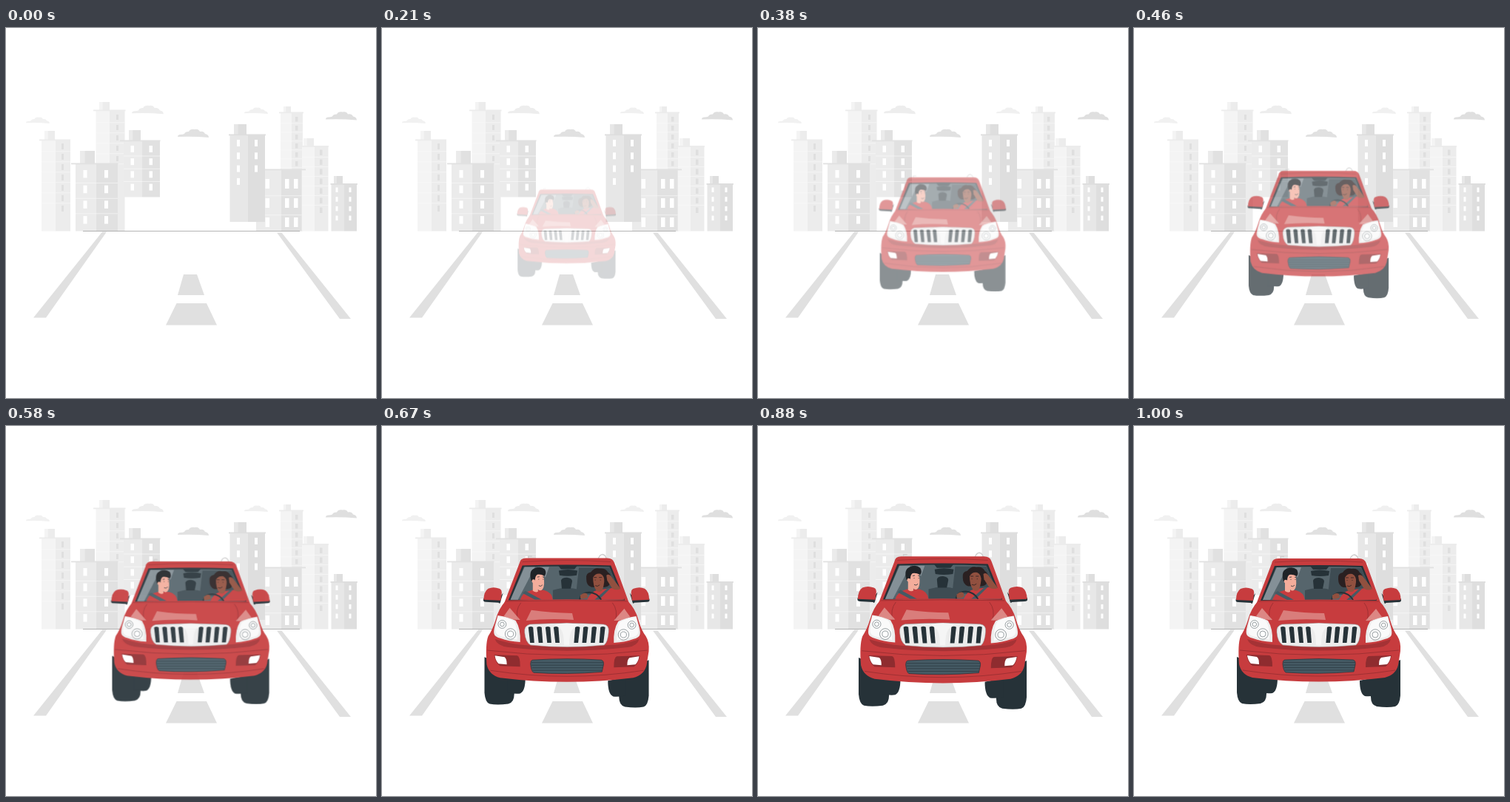
Animation, 500 px wide and 500 px high, one loop 1.04 s. Source, as an HTML page:

```html
<!DOCTYPE html>
<html lang="en">
<head>
<meta charset="utf-8">
<title>Car in the city</title>
<style>
  html, body { margin: 0; height: 100%; overflow: hidden; background: #fff; }
  svg { display: block; width: 100vw; height: 100vh; }
</style>
</head>
<body>
<svg viewBox="0 0 500 500">
  <defs>
    <path id="cloud" d="M0 11Q0 8 4 8Q7 8 9 7Q10 4 15 4Q17 0 23 1Q28 0 30 4Q35 3 37 7Q42 8 42 12Q21 10 0 11Z"/>
    <g id="mirror">
      <path fill="#263238" d="M138 233Q136 238 141 238L158 239Q160 242 161 236L164 226L160 231Z"/>
      <path fill="#c73c3e" d="M138 235Q138 224 144 220Q151 217 159 220Q163 221 162 228L161 236Z"/>
    </g>
    <g id="wheel" fill="#263238">
      <path d="M139 312V360Q140 373 146 375Q156 377 171 375Q179 373 179 362V330Z"/>
      <path d="M170 335V360Q181 362 187 361Q194 358 194 340Z"/>
    </g>
    <g id="lamp">
      <path fill="#ededed" d="M157 256Q172 258 181 263Q188 274 187 292Q171 291 161 287Q153 285 152 281Q151 278 153 270Z"/>
      <path fill="#fafafa" d="M157 257Q172 259 179 264Q184 274 183 289L160 284Q154 282 154 276Z"/>
      <g fill="#fff" stroke="#6d777b" stroke-width=".7">
        <circle cx="162.8" cy="268" r="5.4"/><circle cx="162.8" cy="268" r="2.8"/>
        <circle cx="174" cy="281" r="7.2"/><circle cx="174" cy="281" r="4"/>
      </g>
      <path fill="#e3a09c" opacity=".75" d="M173 246L187 262Q178 263 165 257Z"/>
      <path fill="#8f2c2f" d="M152 309L183 310Q187 311 187 325L160 324Q154 320 152 309Z"/>
      <path fill="#fff" d="M153 310L166 312Q169 314 169 322L158 321Q154 317 153 310Z"/>
    </g>
  </defs>

  <g id="city"></g>
  <path stroke="#a2a2a2" stroke-width=".8" d="M104 274.5H397"/>
  <path fill="#e0e0e0" d="M130 275.5H136L54 391.5H37ZM366 276.5H372.5L466 393H451ZM240 333H258L268 361H232ZM230.500 372H271L285 401.500H216Z"/>

  <g id="car">
    <use href="#wheel"/>
    <use href="#wheel" transform="matrix(-1 0 0 1 499 4)"/>
    <use href="#mirror"/>
    <use href="#mirror" transform="matrix(-1 0 0 1 498.500 0)"/>

    <!-- cabin -->
    <path fill="none" stroke="#cfcfcf" stroke-width="1.500" d="M292 180Q294 174 298 174Q302 175 303 180M198 179V176.500H203"/>
    <path fill="#c73c3e" d="M186 186Q187 179 195 179H304Q312 179 314 186L334 241H165Z"/>
    <path fill="none" stroke="#8f2c2f" stroke-width=".6" d="M190 184Q250 180 309 184"/>
    <path fill="#263238" d="M190 189Q250 187 309 189L328 236H171Z"/>
    <path fill="#56656c" d="M192 191Q250 189 307 191L325 235H174Z"/>
    <path fill="#849097" d="M193 191H207L184 235H174ZM211 191H226L221 205Z"/>
    <path fill="#3e4c53" d="M266 192H307L322 228H262ZM231 222Q250 216 268 222V235H231Z"/>
    <path fill="#263238" d="M238 189H264L260 194H242ZM239 196Q251 193 264 196L263 202Q251 204 240 202ZM242 209Q243 205 250 205Q257 206 257 210L255 220H243Z"/>

    <!-- passenger -->
    <path fill="#c73c3e" d="M187 235Q190 225 203 222H219Q230 225 231 235Z"/>
    <path fill="#f4ad9b" d="M204 199H218Q221 216 217 221Q214 224 211 221V224Q208 226 204 223Z"/>
    <path fill="#1f2327" d="M202 210Q198 196 206 193Q214 189 220 194Q223 199 220 203Q214 200 210 201Q207 203 207 209Z"/>
    <circle cx="205" cy="210" r="2.300" fill="#f4ad9b"/>
    <path fill="none" stroke="#263238" stroke-width=".8" d="M210 204.500L213 204M217 204L219 205M212 207V208M218 207V208M212 216Q215 218 217 215"/>
    <path fill="#455a64" d="M190 226L194 223L216 235H207Z"/>

    <!-- driver -->
    <path fill="#2a2021" d="M276 207Q275 199 282 198Q287 191 294 193Q302 192 305 198Q311 202 308 209Q309 217 301 218H283Q276 216 276 207Z"/>
    <path fill="#c73c3e" d="M277 235Q282 224 291 222L312 219L322 220Q328 228 327 235Z"/>
    <path fill="#91503f" d="M303 202Q306 200 309 203L322 220Q318 223 311 220L304 209Z"/>
    <path fill="#91503f" d="M285 205Q288 199 295 200Q301 203 300 211Q299 219 297 223Q292 226 289 222Q285 216 285 205Z"/>
    <path fill="none" stroke="#2a2021" stroke-width=".8" d="M286 205H290M293 205H297M288 208V209M295 208V209M288 216Q291 218 294 215"/>
    <path fill="#455a64" d="M304 220L309 219L293 235H287Z"/>
    <path fill="none" stroke="#263238" stroke-width="2" d="M267 235Q269 225 280 225Q291 226 296 235"/>
    <path fill="#91503f" d="M268 229Q273 224 277 227L278 232Q271 235 268 233Z"/>

    <!-- front -->
    <path fill="#c73c3e" d="M168 236Q250 233 331 236Q342 247 346 262Q350 276 356 284Q361 292 360 304L357 323Q354 336 339 340Q250 351 160 340Q145 336 142 322Q140 295 144 284Q150 275 154 262Q158 247 168 236Z"/>
    <path fill="#e3a09c" opacity=".65" d="M202 249Q230 253 257 253L259 262Q225 260 195 263Z"/>
    <path fill="none" stroke="#8f2c2f" stroke-width=".7" d="M168 237Q250 235 331 237M188 239Q180 249 184 263M311 239Q319 249 315 263M143 303Q250 316 358 303M147 330Q250 346 353 330"/>
    <path fill="#a53235" d="M153 288Q177 295 193 296Q250 302 307 296Q328 295 347 288Q345 297 332 299Q250 308 171 299Q156 297 153 288Z"/>
    <path fill="#ececec" stroke="#8e9698" stroke-width=".5" d="M200 268Q250 265 299 268Q307 269 306 278Q305 292 300 296Q250 301 201 296Q194 292 193 279Q192 270 200 268Z"/>
    <g id="slats" fill="#263238"></g>
    <path fill="#f5f5f5" d="M234 268Q250 265 265 268L257 275Q253 280 253 296H246Q246 280 242 275Z"/>
    <path fill="#455a64" stroke="#263238" stroke-width=".7" d="M204 316Q250 313 296 316Q300 317 299 323L297 332Q250 336 205 333Q202 331 201 322Q201 316 204 316Z"/>
    <path fill="none" stroke="#2c3b43" stroke-width=".8" d="M202 319.500H299M202 323H299M203 326.500H298M204 330H297"/>
    <use href="#lamp"/>
    <use href="#lamp" transform="matrix(-1 0 0 1 500 1)"/>
  </g>
</svg>
<script>
const $ = id => document.getElementById(id);
const rect = (x, y, w, h, fill) =>
  `<rect x="${x}" y="${y}" width="${w}" height="${h}" fill="${fill}"/>`;

// Walls left and right of an edge, a ledge, a chimney and columns of windows.
function tower({ x, edge, end, top, base = 274.5, tones, ledge, chimney, cols, size, first, step, rows, glass = '#fff', lines }) {
  const [light, dark] = tones;
  let out = rect(x, top, edge - x, base - top, light) + rect(edge, top, end - edge, base - top, dark);
  if (chimney) {
    const [a, b, y] = chimney;
    out += rect(a, y, b - a, top - y, dark) + rect(a, y, (b - a) / 3, top - y, light);
  }
  out += rect(ledge[0], top - 1, ledge[1] - ledge[0], 1.8, dark);
  cols.forEach((c, i) => {
    const count = Array.isArray(rows) ? rows[i] : rows;
    for (let r = 0; r < count; r++) out += rect(c, first + r * step, size[0], size[1], glass);
  });
  if (lines) for (let r = 1; r <= lines; r++) out += rect(x, first + r * step - 3.5, end - x, .6, '#fafafa');
  return out;
}

const pale = ['#f4f4f4', '#ececec'], mid = ['#ebebeb', '#e1e1e1'], deep = ['#e7e7e7', '#dedede'];
const towers = [
  { x: 48, edge: 67, end: 87, top: 151.5, tones: pale, ledge: [45, 87], chimney: [52, 66, 139], cols: [75], size: [3, 8], first: 156, step: 14, rows: 7, glass: '#dfdfdf', lines: 6 },
  { x: 121.5, edge: 140, end: 160.5, top: 111.5, tones: pale, ledge: [118, 161.5], chimney: [126, 140, 100], cols: [149], size: [3, 7], first: 117, step: 14, rows: 5, glass: '#dfdfdf', lines: 5 },
  { x: 159, edge: 184, end: 208, top: 152.5, base: 228.5, tones: mid, ledge: [154, 208.5], chimney: [166, 182, 138], cols: [168.5, 193.5], size: [4.5, 9], first: 159, step: 17.2, rows: 4, lines: 3 },
  { x: 94, edge: 122, end: 151, top: 183.5, tones: mid, ledge: [88, 151.5], chimney: [100, 120, 166], cols: [104.500, 133], size: [5, 10.5], first: 192, step: 20.7, rows: 4, lines: 3 },
  { x: 371, edge: 386, end: 401, top: 114.5, tones: pale, ledge: [369, 402], chimney: [375, 385, 106], cols: [391], size: [3.5, 6.5], first: 120, step: 12, rows: 6, glass: '#dfdfdf', lines: 6 },
  { x: 400, edge: 417, end: 435.5, top: 160, tones: pale, ledge: [398, 436], chimney: [402, 416, 149], cols: [424], size: [3.5, 7.5], first: 164.5, step: 13, rows: 7, glass: '#dfdfdf', lines: 6 },
  { x: 338, edge: 372, end: 399.5, top: 191.5, tones: mid, ledge: [350, 405], cols: [350.500, 377, 389], size: [5.500, 13], first: 204, step: 26, rows: 3, lines: 2 },
  { x: 302.5, edge: 326.5, end: 350, top: 144.5, base: 262, tones: deep, ledge: [301, 351], chimney: [308, 325, 130], cols: [312, 336], size: [4, 9], first: 151, step: 17.3, rows: [4, 3] },
  { x: 439.5, edge: 457, end: 474, top: 211, tones: deep, ledge: [438.5, 475], chimney: [443, 455, 200], cols: [445.5, 463.5], size: [3, 6.5], first: 215.5, step: 12.7, rows: 4 }
];
const clouds = [[27, 120, .76, '#f1f1f1'], [170, 104, 1.02, '#ededed'], [232, 136, 1, '#e1e1e1'], [322, 107, .76, '#f0f0f0'], [432, 112.5, 1, '#dfdfdf']];
// The tower block's flank stays white left of the taller neighbour.
$('city').innerHTML = clouds.map(([x, y, s, c]) =>
  `<use href="#cloud" fill="${c}" transform="translate(${x} ${y}) scale(${s})"/>`).join('')
  + towers.map(tower).join('');

let slats = '';
for (const side of [-1, 1])
  for (const d of [14.5, 25.5, 37, 48.5]) {
    const x = 249.7 + side * d, lean = side * 2;
    slats += `<path d="M${x - 3.2} 272Q${x} 270 ${x + 3.2} 272L${x + 2.8 - lean} 293H${x - 2.8 - lean}Z"/>`;
  }
$('slats').innerHTML = slats;

const bezier = (a, b, s) => 3 * (1 - s) ** 2 * s * a + 3 * (1 - s) * s * s * b + s ** 3;

// Overshooting ease: cubic-bezier(.36, -.01, .5, 1.38)
function ease(x) {
  if (x >= 1) return 1;
  let lo = 0, hi = 1;
  for (let i = 0; i < 24; i++) {
    const m = (lo + hi) / 2;
    if (bezier(.36, .5, m) < x) lo = m; else hi = m;
  }
  return bezier(-.01, 1.38, lo);
}

const car = $('car'), LOOP = 1040, FPS = 24;
const start = performance.now();

function draw(now) {
  const t = Math.max(0, now - start) % LOOP;
  const step = Math.floor((t + 4) * FPS / 1000);
  const p = ease(step / FPS + .025);
  const scale = .5 + p / 2;
  car.setAttribute('opacity', step < 3 ? 0 : Math.min(1, p));
  car.setAttribute('transform', `translate(249.300 277) scale(${scale}) translate(-249.300 -277)`);
  requestAnimationFrame(draw);
}
draw(start);
</script>
</body>
</html>
```
